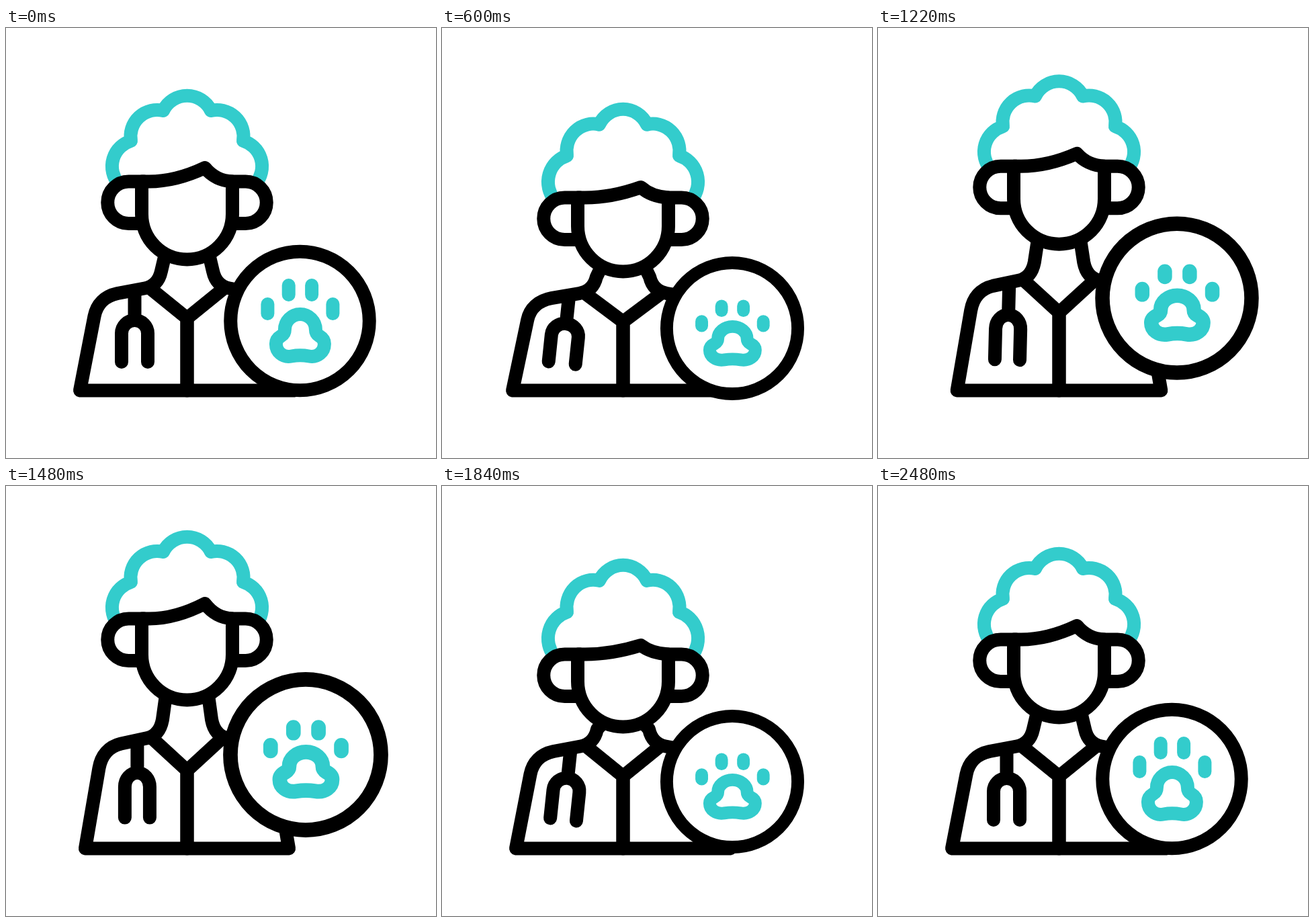
These frames come from a looping animation (640x640 px, 2880 ms). An HTML page with a canvas:

```html
<!DOCTYPE html>
<html lang="en">
<head>
<meta charset="utf-8">
<title>Veterinarian icon</title>
<style>
  html, body { margin: 0; width: 100%; height: 100%; overflow: hidden; background: #fff; }
  canvas { display: block; width: 640px; height: 640px; }
</style>
</head>
<body>
<canvas id="stage" width="640" height="640"></canvas>
<script>
const ctx = document.getElementById('stage').getContext('2d');
const LOOP = 2880, STEP = 20;
const BLACK = '#000', TEAL = '#33cccc', WHITE = '#fff';
const MID = 269.5, FLOOR = 539.5;

// All parts share one set of key times: squash, stretch, squash, settle.
const TIMES = [220, 430, 600, 980, 1480, 1700, 1840, 2080, 2160, 2460];
const TRACKS = {
  body:   [0, -1.75, -.62, .87, 1, -1.4, 0, .42, .35, 0],
  hair:   [0, 42, 20, -14, -25, 38, 17, -12.5, -9, 0],
  ears:   [0, 44, 24, -8, -31, 41, 22, -16, -15, 0],
  fringe: [0, 46, 29, -2, -33, 43, 29, -18, -20, 0],
  chin:   [0, 40, 18, -16, -26, 36, 14, -11, -8, 0],
  badgeY: [0, 37, 11, -29, -36, 37, 4, -18, -13, 0],
  badge:  [1, .9, .945, 1.053, 1.085, .9, .945, 1.05, 1.035, 1],
  paw:    [0, .8, 1, .93, .85, .95, 1, .2, 0, 0],
  swing:  [0, 4, 6, 3.5, 0, 4, 6, -6, -8, 0]
};

// Monotone cubic interpolation through the keys.
function sample(v, t) {
  const last = TIMES.length - 1;
  if (t <= TIMES[0]) return v[0];
  if (t >= TIMES[last]) return v[last];
  const grad = i => (v[i + 1] - v[i]) / (TIMES[i + 1] - TIMES[i]);
  const slope = i => {
    if (i === 0 || i === last) return 0;
    const a = grad(i - 1), b = grad(i);
    return a * b <= 0 ? 0 : 2 * a * b / (a + b);
  };
  const i = TIMES.findIndex(k => k > t) - 1;
  const h = TIMES[i + 1] - TIMES[i], u = (t - TIMES[i]) / h, w = 1 - u;
  return v[i] * w * w * (1 + 2 * u) + v[i + 1] * u * u * (3 - 2 * u)
    + h * u * w * (slope(i) * w - slope(i + 1) * u);
}

// The matrix shapes the path only, so line weight stays constant.
function draw(d, { m, color = BLACK, width = 20, fill } = {}) {
  const path = new Path2D();
  path.addPath(new Path2D(d), m || new DOMMatrix());
  if (fill) { ctx.fillStyle = fill; ctx.fill(path); }
  ctx.strokeStyle = color;
  ctx.lineWidth = width;
  ctx.stroke(path);
}

const flip = () => new DOMMatrix([-1, 0, 0, 1, 2 * MID, 0]);

function drawBody(p) {
  const sx = 1 - .05 * p.body, sy = 1 + .08 * p.body;
  const m = new DOMMatrix().translate(MID, FLOOR).scale(sx, sy).translate(-MID, -FLOOR);
  const neckY = FLOOR + (343 + p.chin - FLOOR) / sy;
  const half = `M235.5 ${neckY}L231 362C228 376 220 385 206 387.5L166 395
    C147 399 135 411 131.5 429L110 ${FLOOR}H${MID}V432L214 387`;
  draw(half, { m });
  draw(half, { m: m.multiply(flip()) });

  const tube = m.transformPoint(new DOMPoint(191.5, 392));
  const hang = new DOMMatrix().translate(tube.x, tube.y).rotate(p.swing)
    .scale(sx, sy).translate(-191.5, -392);
  draw('M191.5 392V434M172 497V454.5A19.5 19.5 0 0 1 211 454.5V497', { m: hang });
}

function drawHead(p) {
  const top = 100.5 + p.hair;
  const stretch = 1 + Math.max(0, p.ears - p.hair) / 128;
  const m = new DOMMatrix().translate(0, top).scale(1, stretch).translate(0, -100.5);
  const arc = 'A39.5 39.5 0 0 1 ';
  draw(`M167 231${arc}186 168${arc}234 123${arc}305 123${arc}353 168${arc}372 231`,
    { m, color: TEAL });

  const earTop = 228.5 + p.ears, earLow = 291 + p.ears;
  const ear = `M206 ${earLow}H182.5A31.25 31.25 0 0 1 182.5 ${earTop}H206`;
  draw(ear, { fill: WHITE });
  draw(ear, { fill: WHITE, m: flip() });

  const jaw = 277 + p.chin, peak = 208 + p.fringe;
  const rise = earTop - peak;
  draw(`M202 ${earTop}V${jaw}A67.5 67.5 0 0 0 337 ${jaw}V${earTop}
    C321 ${earTop - 1} 308 ${earTop - rise * .3} 296 ${peak}
    C270 ${earTop - rise * .4} 243 ${earTop} 213 ${earTop}Z`, { fill: WHITE });
}

function drawBadge(p) {
  ctx.save();
  ctx.translate(437.5 + 100 * (p.badge - 1), 436 + p.badgeY);
  ctx.scale(p.badge, p.badge);
  draw('M103.25 0A103.25 103.25 0 1 1 -103.25 0A103.25 103.25 0 1 1 103.25 0Z', { fill: WHITE });

  ctx.translate(.4, 0);
  const toeHalf = 7 - 3.6 * p.paw;
  const toe = (x, y) => draw(`M${x} ${y - toeHalf}V${y + toeHalf}`, { color: TEAL });
  for (const side of [-1, 1]) {
    toe(side * 17.2, -46 + 14.5 * p.paw);
    toe(side * 48.5, -18 + 10.5 * p.paw);
  }
  const m = new DOMMatrix().translate(0, 53 - 3 * p.paw)
    .scale(1, 1 - .163 * p.paw).translate(0, -53);
  draw(`M-23 13A23 23 0 0 1 23 13C23 18 25 20 28 22C33 25 36 29 36 34
    C36 46 26 55 13 52.5Q0 50 -13 52.5C-26 55 -36 46 -36 34
    C-36 29 -33 25 -28 22C-25 20 -23 18 -23 13Z`, { m, color: TEAL });
  ctx.restore();
}

function render(t) {
  const pose = {};
  for (const key in TRACKS) pose[key] = sample(TRACKS[key], t);
  ctx.fillStyle = WHITE;
  ctx.fillRect(0, 0, 640, 640);
  ctx.lineCap = ctx.lineJoin = 'round';
  drawBody(pose);
  drawHead(pose);
  drawBadge(pose);
}

let start;
function tick(now) {
  start ??= now;
  const t = Math.max(0, now - start) % LOOP;
  render(Math.floor(t / STEP) * STEP);
  requestAnimationFrame(tick);
}
render(0);
requestAnimationFrame(tick);
</script>
</body>
</html>
```
